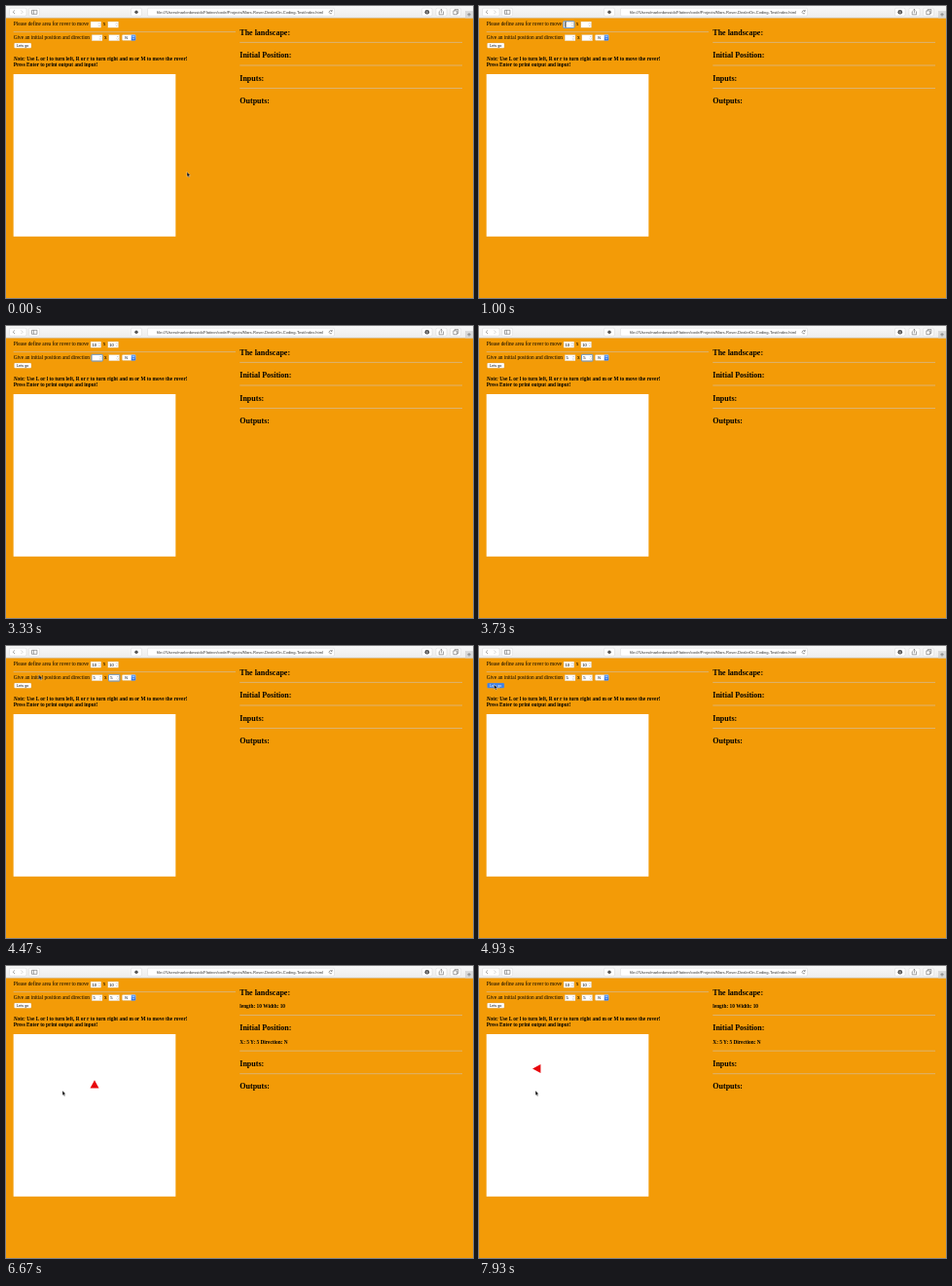
An HTML page that plays this animation: 480x300 px, repeating every 8000 ms.

```html
<!DOCTYPE html>
<html lang="en">
<head>
<meta charset="utf-8">
<title>Mars rover</title>
<style>
html, body { margin: 0; width: 100%; height: 100%; overflow: hidden; background: #f39b07; }
svg { display: block; width: 480px; height: 300px; }
text { font: 5.333px "Liberation Serif", serif; white-space: pre; }
.bold { font-weight: bold; }
.head { font-size: 8px; font-weight: bold; }
.ui { font: 4.2px "Liberation Sans", sans-serif; }
.rule { stroke: #d3bd9c; stroke-width: .7; }
.icon { fill: none; stroke: #666; stroke-width: .6; }
.field { fill: #fff; stroke: #c9b48e; stroke-width: .3; }
.ring { fill: none; stroke: #6c9bd2; stroke-width: 1; }
.button { fill: #fff; stroke: #c8a468; stroke-width: .3; }
.pressed .button { fill: #3f82e8; }
.pressed text { fill: #fff; }
</style>
</head>
<body>
<svg viewBox="0 0 480 300">
  <defs>
    <linearGradient id="chrome" x2="0" y2="1"><stop stop-color="#f8f8f8"/><stop offset="1" stop-color="#ededed"/></linearGradient>
    <linearGradient id="blue" x2="0" y2="1"><stop stop-color="#6fa9f5"/><stop offset="1" stop-color="#2368dc"/></linearGradient>
    <clipPath id="address"><rect x="147" y="2" width="182.5" height="9"/></clipPath>
  </defs>

  <rect width="480" height="12.3" fill="url(#chrome)"/>
  <path d="M0 12.2H480" stroke="#bbb" stroke-width=".4"/>
  <g fill="#fff" stroke="#ccc" stroke-width=".4">
    <rect x="3.5" y="2.2" width="17.5" height="8" rx="1.3"/>
    <rect x="23.5" y="2.2" width="11" height="8" rx="1.3"/>
    <rect x="128.5" y="2.2" width="11" height="8" rx="1.3"/>
    <rect x="145.5" y="2.2" width="192" height="8" rx="1.3"/>
    <rect x="427.5" y="2.2" width="10.5" height="8" rx="1.3"/>
    <rect x="442" y="2.2" width="11" height="8" rx="1.3"/>
    <rect x="456.5" y="2.2" width="11" height="8" rx="1.3"/>
    <rect x="472.3" y="5.5" width="8" height="6.6" fill="#d8d8d8"/>
  </g>
  <path class="icon" d="M9 4.4 7.2 6.2 9 8M26.5 4.3h5.4v4h-5.4zM28.4 4.3v4M446 5.8h-.8v3h4.4v-3h-.8M447.4 7.4V3.3m-1.2 1.2 1.2-1.2 1.2 1.2M459.8 4.9h3.8v3.8h-3.8zM461.1 4.9V3.6h3.8v3.8h-1.3M474.2 8.8h3.6M476 7v3.6M335 5.2A1.6 1.6 0 1 0 335.2 7M335.2 3.9v1.5h-1.4"/>
  <path class="icon" d="M15.5 4.4 17.3 6.2 15.5 8" style="stroke:#bbb"/>
  <circle cx="134" cy="6.2" r="1.7" fill="#555"/>
  <circle cx="432.8" cy="6.2" r="2.3" fill="#444"/>
  <path d="M432.8 4.7v2.6m-1-.9 1 1 1-1" fill="none" stroke="#fff" stroke-width=".5"/>
  <text x="155" y="7.7" class="ui" style="font-size:4.05px" fill="#333" clip-path="url(#address)">file:///Users/marlonbessick/Flatiron/code/Projects/Mars-Rover-DealerOn-Coding-Test/index.html</text>

  <text x="7.7" y="20.2">Please define area for rover to move</text>
  <text x="99.7" y="20.2">x</text>
  <path class="rule" d="M7.7 26.6H236"/>
  <text x="7.7" y="34">Give an initial position and direction</text>
  <text x="101" y="34">x</text>
  <g id="fields"></g>
  <rect class="button" x="119.3" y="29.5" width="14" height="6" rx="1"/>
  <path d="M128.7 29.5h3.6a1 1 0 0 1 1 1v4a1 1 0 0 1-1 1h-3.6z" fill="url(#blue)"/>
  <path d="M130 31.9l1-1 1 1m-2 1.2 1 1 1-1" fill="none" stroke="#fff" stroke-width=".5"/>
  <text class="ui" x="122.2" y="33.9" style="font-size:3.67px">N</text>
  <g id="go">
    <rect class="button" x="8.4" y="37.9" width="17.6" height="5.4" rx="1"/>
    <text class="ui" x="17.2" y="42" text-anchor="middle" style="font-size:3.8px">Lets go</text>
  </g>
  <text class="bold" x="7.7" y="55.8"><tspan font-style="italic">Note:</tspan> Use L or l to turn left, R or r to turn right and m or M to move the rover!</text>
  <text class="bold" x="7.7" y="61.9">Press Enter to print output and input!</text>
  <rect x="7.67" y="70" width="166.67" height="166.8" fill="#fff"/>

  <text class="head" x="240.3" y="29.6">The landscape:</text>
  <text class="bold result" x="240.3" y="42.9">length: 10 Width: 10</text>
  <g class="push">
    <path class="rule" d="M240.3 37.4H469"/>
    <text class="head" x="240.3" y="53.1">Initial Position:</text>
    <text class="bold result" x="240.3" y="66.5">X: 5 Y: 5 Direction: N</text>
    <g class="push">
      <path class="rule" d="M240.3 61H469M240.3 84.5H469"/>
      <text class="head" x="240.3" y="76.7">Inputs:</text>
      <text class="head" x="240.3" y="100.2">Outputs:</text>
    </g>
  </g>

  <path id="rover" d="M0-4.4 4.5 4H-4.5z" fill="#e8060c"/>
  <path id="beam" d="M-1-2.6Q0-2.6 0-1.8V1.8Q0 2.6-1 2.6M1-2.6Q0-2.6 0-1.8V1.8Q0 2.6 1 2.6" fill="none" stroke="#333" stroke-width=".5"/>
  <path id="arrow" d="M0 0V4.9L1.1 3.9 1.9 5.7 2.8 5.3 2 3.6H3.5z" fill="#111" stroke="#fff" stroke-width=".35"/>
</svg>
<script>
const LOOP = 8000, TICK = 1000 / 15;
const $ = id => document.getElementById(id);
const all = selector => [...document.querySelectorAll(selector)];
const show = (el, on) => el.setAttribute('visibility', on ? 'visible' : 'hidden');
const place = (el, x, y, turn = 0) => el.setAttribute('transform', `translate(${x} ${y}) rotate(${turn})`);

// Each field: position, focus interval, and typed characters with their times
const fields = [
  { x: 87, y: 16, focus: [930, 1900], keys: [[1530, '1'], [1670, '0']] },
  { x: 104.8, y: 16, focus: [2000, 2800], keys: [[2270, '1'], [2470, '0']] },
  { x: 88.2, y: 29.6, focus: [2800, 3600], keys: [[3470, '5']] },
  { x: 105.8, y: 29.6, focus: [3600, 4930], keys: [[3730, '5']] }
];
for (const f of fields) {
  const g = document.createElementNS('http://www.w3.org/2000/svg', 'g');
  g.innerHTML = `<rect class="field" width="10.8" height="6.2"/>
    <path d="M8 2.5l.9-.9.9.9m-1.8 1.4.9.9.9-.9" fill="none" stroke="#888" stroke-width=".45"/>
    <text class="ui" x="1.4" y="4.6"></text>
    <path class="caret" d="M1.5 1v4.2" stroke="#222" stroke-width=".4"/>
    <rect class="ring" x="-.3" y="-.3" width="11.4" height="6.8" rx=".6"/>`;
  place(g, f.x, f.y);
  $('fields').append(g);
  f.text = g.querySelector('text');
  f.caret = g.querySelector('.caret');
  f.ring = g.querySelector('.ring');
}

// Pointer stops: time, x, y
const stops = [[70, 173, 93], [270, 166, 86], [600, 118, 42], [930, 89, 19], [4200, 86, 20], [4470, 34, 29.5],
  [4730, 15.5, 39.5], [5070, 15.5, 39.5], [5270, 42, 96], [5470, 58, 128]];

function pointerAt(t) {
  if (t < 70) return [186, 170.5];
  const i = stops.findIndex(s => s[0] > t);
  if (i < 0) return stops.at(-1).slice(1);
  const [t0, x0, y0] = stops[i - 1], [t1, x1, y1] = stops[i];
  const p = t0 === 70 ? 0 : (t - t0) / (t1 - t0);
  return [x0 + (x1 - x0) * p, y0 + (y1 - y0) * p];
}

function render(now) {
  const t = Math.floor((now % LOOP + 5) / TICK) * TICK + 5;
  const after = times => times.filter(time => t >= time).length;

  for (const f of fields) {
    const typed = f.keys.filter(k => t >= k[0]);
    const focused = t >= f.focus[0] && t < f.focus[1];
    f.text.textContent = typed.map(k => k[1]).join('');
    show(f.ring, focused);
    show(f.caret, focused && !typed.length && t - f.focus[0] < 530);
  }

  const [x, y] = pointerAt(t);
  const typing = t >= 1470 && t < 4200;
  const overField = t >= 870 && t < 1470;
  place($('arrow'), x, y);
  place($('beam'), 89, 19);
  show($('arrow'), !typing && !overField);
  show($('beam'), overField);
  $('go').classList.toggle('pressed', t >= 4930 && t < 5000);

  const started = t >= 5000;
  all('.result').forEach(el => show(el, started));
  all('.push').forEach(el => place(el, 0, started ? 13.1 : 0));
  show($('rover'), started);
  place($('rover'), 91 - 15.8 * after([7670, 7930]), 154 - 16.2 * after([6400, 6670, 7000]), t >= 7400 ? -90 : 0);
}

const start = performance.now();
function loop() {
  render(performance.now() - start);
  requestAnimationFrame(loop);
}
loop();
</script>
</body>
</html>
```
